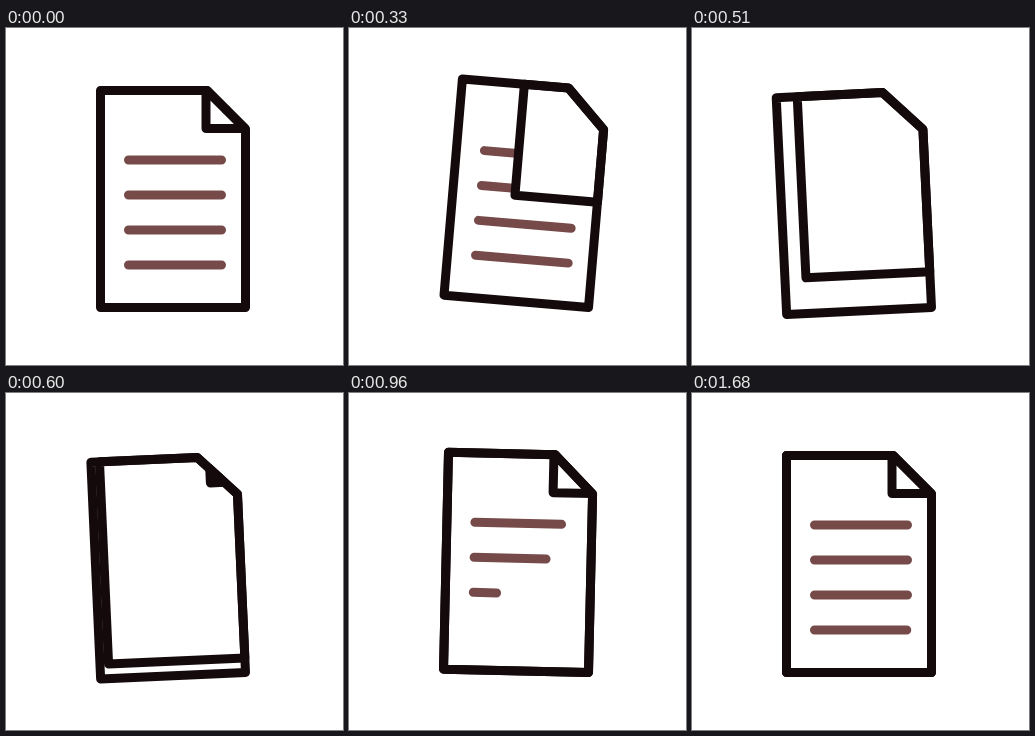
An HTML page that plays this animation: 337x337 px, repeating every 2.4 s.

```html
<!DOCTYPE html>
<html lang="en">
<head>
<meta charset="utf-8">
<title>Page turn</title>
<style>
html, body { margin: 0; height: 100%; overflow: hidden; background: #fff; }
svg { display: block; width: 100vw; height: 100vh; }
path { fill: none; stroke-width: 9; stroke-linecap: round; stroke-linejoin: round; }
.ink { stroke: #140a0c; }
.page { fill: #fff; }
.text { stroke: #774a4a; }
</style>
</head>
<body>
<svg viewBox="0 0 337 337">
  <g id="doc">
    <path class="text" d="M122.5 132H215.5M122.5 167H215.5M122.5 202H215.5M122.5 237H215.5"/>
    <path id="turn" class="ink page"/>
    <path id="lines" class="text"/>
    <path id="corner" class="ink page"/>
    <path class="ink" d="M94.5 62.5H201L239.5 101V279.5H94.5Z"/>
  </g>
</svg>
<script>
const LOOP = 2400, STEP = 30;
const [doc, turn, lines, corner] =
  ['doc', 'turn', 'lines', 'corner'].map(id => document.getElementById(id));

const progress = (t, from, to) => Math.min(1, Math.max(0, (t - from) / (to - from)));
const mix = (a, b, p) => a + (b - a) * p;
const easeOut = p => 1 - (1 - p) ** 2;
const easeInOut = p => (1 - Math.cos(Math.PI * p)) / 2;

// Damped swing: [time, degrees]
const swing = [[0, 0], [240, 6.9], [540, -3], [860, 2], [1110, 0]];

function angle(t) {
  for (let i = 1; i < swing.length; i++) {
    const [t0, a0] = swing[i - 1], [t1, a1] = swing[i];
    if (t < t1) return mix(a0, a1, (i === 1 ? easeOut : easeInOut)(progress(t, t0, t1)));
  }
  return 0;
}

// Flap with its free corner at (x, y), bounded by the cut page corner
function flap(x, y) {
  const top = Math.max(62.5, x - 138.5), right = Math.min(239.5, y + 138.5);
  return `M${x} ${top}V${y}H${right}V${Math.min(y, 101)}L${Math.max(x, 201)} ${top}Z`;
}

function textLines(t) {
  let d = '';
  for (let i = 0; i < 4; i++) {
    const age = t - 624 - 150 * i;
    if (age <= 0) continue;
    const grown = age > 700 ? 1 : 1 - Math.exp(-0.008 * age);
    d += `M122.5 ${132 + 35 * i}H${122.5 + 93 * grown}`;
  }
  return d;
}

function draw(now) {
  const t = Math.floor(now % LOOP / STEP) * STEP;
  const p = easeOut(progress(t, 200, 760));
  const q = easeOut(progress(t, 560, 760));
  doc.setAttribute('transform', `rotate(${angle(t)} 239.5 279.5)`);
  turn.setAttribute('d', flap(mix(200, 94.5, p), mix(100.5, 279.5, p)));
  corner.setAttribute('d', flap(mix(220.25, 200, q), mix(81.75, 100.5, q)));
  lines.setAttribute('d', textLines(t));
}

const start = performance.now();
function tick() {
  draw(performance.now() - start);
  requestAnimationFrame(tick);
}
tick();
</script>
</body>
</html>
```
